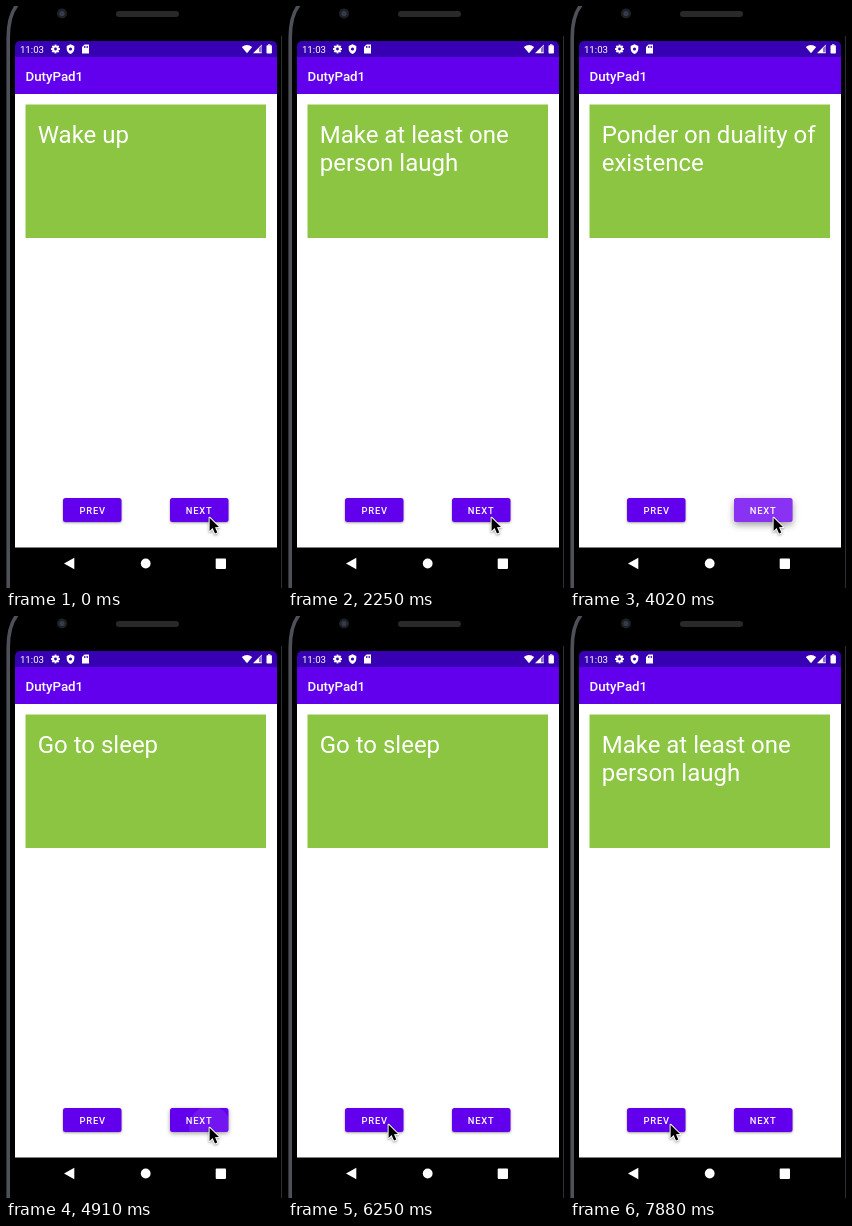
Recreate the animation shown at these times as an HTML page with a canvas. Size 276 px wide and 582 px high, loop 8000 ms.

```html
<!DOCTYPE html>
<html lang="en">
<head>
<meta charset="utf-8">
<title>Task list</title>
<style>
html, body { margin: 0; width: 100%; height: 100%; overflow: hidden; background: #000; }
canvas { display: block; width: 276px; height: 582px; }
</style>
</head>
<body>
<canvas id="stage"></canvas>
<script>
const W = 276, H = 582, LOOP = 8000;
const canvas = document.getElementById('stage');
const ctx = canvas.getContext('2d');
const dpr = window.devicePixelRatio || 1;
canvas.width = W * dpr;
canvas.height = H * dpr;

const FONT = 'Roboto, "Open Sans", sans-serif';
const PURPLE = '#6200ee', DEEP = '#3700b3', WHITE = '#fff';
const TASKS = [
  ['Wake up'],
  ['Drink Coffee'],
  ['Make at least one', 'person laugh'],
  ['Plant a tree'],
  ['Ponder on duality of', 'existence'],
  ['Go to sleep']
];
const PREV = { label: 'PREV', x: 57, textX: 73.5, step: -1 };
const NEXT = { label: 'NEXT', x: 164, textX: 179.7, step: 1 };

// Each tap: press time, button, extra hold, ripple radius and strength on press
const TAPS = [
  { t: 1050, on: NEXT }, { t: 1950, on: NEXT }, { t: 2690, on: NEXT },
  { t: 3280, on: NEXT }, { t: 3880, on: NEXT, hold: 140 }, { t: 4910, on: NEXT },
  { t: 5950, on: PREV }, { t: 6550, on: PREV },
  { t: 6990, on: PREV, r: 42, a: 0.25 }, { t: 7590, on: PREV }
];
// Pointer positions: time, x, y
const POINTER = [[0, 203, 511], [5210, 190, 511], [5360, 149, 508], [5510, 112, 508], [5660, 100, 508]];

function stateAt(t) {
  let task = 0, ripple = null;
  for (const { t: start, on, hold = 0, r = 21, a = 0.1 } of TAPS) {
    const age = t - start;
    if (age < 0) break;
    const release = 146 + hold;
    if (age >= release) task = (task + on.step + TASKS.length) % TASKS.length;
    if (age < 140) ripple = { on, r, a, lift: r > 30 ? 1 : 0.3 };
    else if (age < release) ripple = { on, r: 80, a: 0.25, lift: 1 };
    else if (age < release + 144) ripple = { on, r: 80, a: 0.18, lift: 0.8 };
    else ripple = null;
  }
  const [, x, y] = POINTER.filter(p => p[0] <= t).pop();
  return { task, ripple, x, y };
}

function rect(x, y, w, h, color) {
  ctx.fillStyle = color;
  ctx.fillRect(x, y, w, h);
}

function roundRect(x, y, w, h, r, color) {
  ctx.beginPath();
  ctx.roundRect(x, y, w, h, r);
  ctx.fillStyle = color;
  ctx.fill();
}

function disc(x, y, r, color) {
  ctx.beginPath();
  ctx.arc(x, y, r, 0, Math.PI * 2);
  ctx.fillStyle = color;
  ctx.fill();
}

function poly(points, color) {
  ctx.beginPath();
  points.forEach(([x, y]) => ctx.lineTo(x, y));
  ctx.closePath();
  ctx.fillStyle = color;
  ctx.fill();
}

function shadow(alpha, blur, dy) {
  ctx.shadowColor = `rgba(0,0,0,${alpha})`;
  ctx.shadowBlur = blur * dpr;
  ctx.shadowOffsetY = dy * dpr;
}

function text(str, x, y, size, weight = 400, spacing = 0) {
  ctx.font = `${weight} ${size}px ${FONT}`;
  ctx.letterSpacing = spacing + 'px';
  ctx.fillStyle = WHITE;
  ctx.fillText(str, x, y);
}

function drawPhone() {
  rect(0, 0, W, H, '#000');
  ctx.beginPath();
  ctx.moveTo(2.2, H);
  ctx.lineTo(2.2, 32);
  ctx.quadraticCurveTo(2.2, 10, 11, -1);
  ctx.lineWidth = 3.6;
  ctx.strokeStyle = '#4e5058';
  ctx.stroke();
  rect(275, 30, 1, H, '#2c2e33');
  disc(56, 7.5, 5, '#1d2025');
  disc(56, 7.5, 2.6, '#343b49');
  roundRect(110, 5, 63, 6, 3, '#292929');
}

function drawStatus() {
  text('11:03', 13.9, 46.6, 9.7);
  // gear
  for (let i = 0; i < 4; i++) {
    ctx.save();
    ctx.translate(49.5, 43);
    ctx.rotate(i * Math.PI / 4);
    rect(-1, -4.4, 2, 8.8, WHITE);
    ctx.restore();
  }
  disc(49.5, 43, 3.3, WHITE);
  disc(49.5, 43, 1.4, DEEP);
  // shield
  ctx.beginPath();
  ctx.moveTo(64.5, 38.3);
  ctx.lineTo(68.3, 40);
  ctx.lineTo(68.3, 43);
  ctx.quadraticCurveTo(68, 46.5, 64.5, 48);
  ctx.quadraticCurveTo(61, 46.5, 60.7, 43);
  ctx.lineTo(60.7, 40);
  ctx.fillStyle = WHITE;
  ctx.fill();
  disc(64.5, 43, 1.6, DEEP);
  // memory card
  poly([[78.5, 38.6], [83, 38.6], [83, 47.4], [76, 47.4], [76, 41]], WHITE);
  for (let i = 0; i < 3; i++) rect(78 + i * 1.6, 40, 0.8, 2, DEEP);
  // wifi, signal, battery
  ctx.beginPath();
  ctx.moveTo(241, 47.3);
  ctx.lineTo(235.8, 41);
  ctx.quadraticCurveTo(241, 37, 246.2, 41);
  ctx.fillStyle = WHITE;
  ctx.fill();
  poly([[247, 47.3], [255.8, 38.5], [255.8, 47.3]], WHITE);
  poly([[253, 42.3], [255.8, 39.5], [255.8, 46.3], [253, 46.3]], '#8b6bd4');
  roundRect(260.5, 39.3, 5.4, 8.2, 0.8, WHITE);
  rect(262, 38.3, 2.4, 1.2, WHITE);
}

function drawButton(b, ripple, px, py) {
  const active = ripple && ripple.on === b;
  const lift = active ? ripple.lift : 0;
  const box = [b.x, 492, 58.5, 24, 2.5];
  ctx.save();
  shadow(0.38, 2.5 + lift * 5, 1 + lift * 2);
  roundRect(...box, PURPLE);
  ctx.restore();
  if (active) {
    ctx.save();
    ctx.beginPath();
    ctx.roundRect(...box);
    ctx.clip();
    disc(px + 1, py, ripple.r, `rgba(255,200,255,${ripple.a})`);
    ctx.restore();
  }
  text(b.label, b.textX, 507.6, 9.35, 500, 0.83);
}

function drawNav() {
  poly([[58, 557.5], [68.3, 551.8], [68.3, 563.2]], WHITE);
  disc(139.7, 557.5, 4.9, WHITE);
  roundRect(209.7, 552.6, 10.3, 10.3, 0.8, WHITE);
}

function drawPointer(x, y) {
  ctx.save();
  ctx.translate(x + 0.6, y + 0.7);
  ctx.beginPath();
  for (const [px, py] of [[0, 0], [0, 13.2], [3, 10.4], [5.4, 15.8], [7.7, 14.8], [5.4, 9.6], [9.4, 9.4]]) {
    ctx.lineTo(px, py);
  }
  ctx.closePath();
  ctx.lineJoin = 'round';
  ctx.lineWidth = 2;
  ctx.strokeStyle = WHITE;
  shadow(0.4, 2.5, 1);
  ctx.stroke();
  shadow(0, 0, 0);
  ctx.fillStyle = '#000';
  ctx.fill();
  ctx.restore();
}

function draw(now) {
  const s = stateAt(now % LOOP);
  ctx.setTransform(dpr, 0, 0, dpr, 0, 0);
  drawPhone();
  roundRect(9, 35, 262, 20, [5, 5, 0, 0], DEEP);
  rect(9, 51, 262, 37, PURPLE);
  rect(9, 88, 262, 453.5, WHITE);
  drawStatus();
  text('DutyPad1', 19.5, 74.8, 13.3, 500);
  rect(19.5, 98.5, 240.5, 133.5, '#8bc541');
  TASKS[s.task].forEach((line, i) => text(line, 31.7, 137 + i * 28, 24));
  for (const b of [PREV, NEXT]) drawButton(b, s.ripple, s.x, s.y);
  drawNav();
  drawPointer(s.x, s.y);
}

const began = performance.now();
function tick() {
  draw(performance.now() - began);
  requestAnimationFrame(tick);
}
tick();
</script>
</body>
</html>
```
